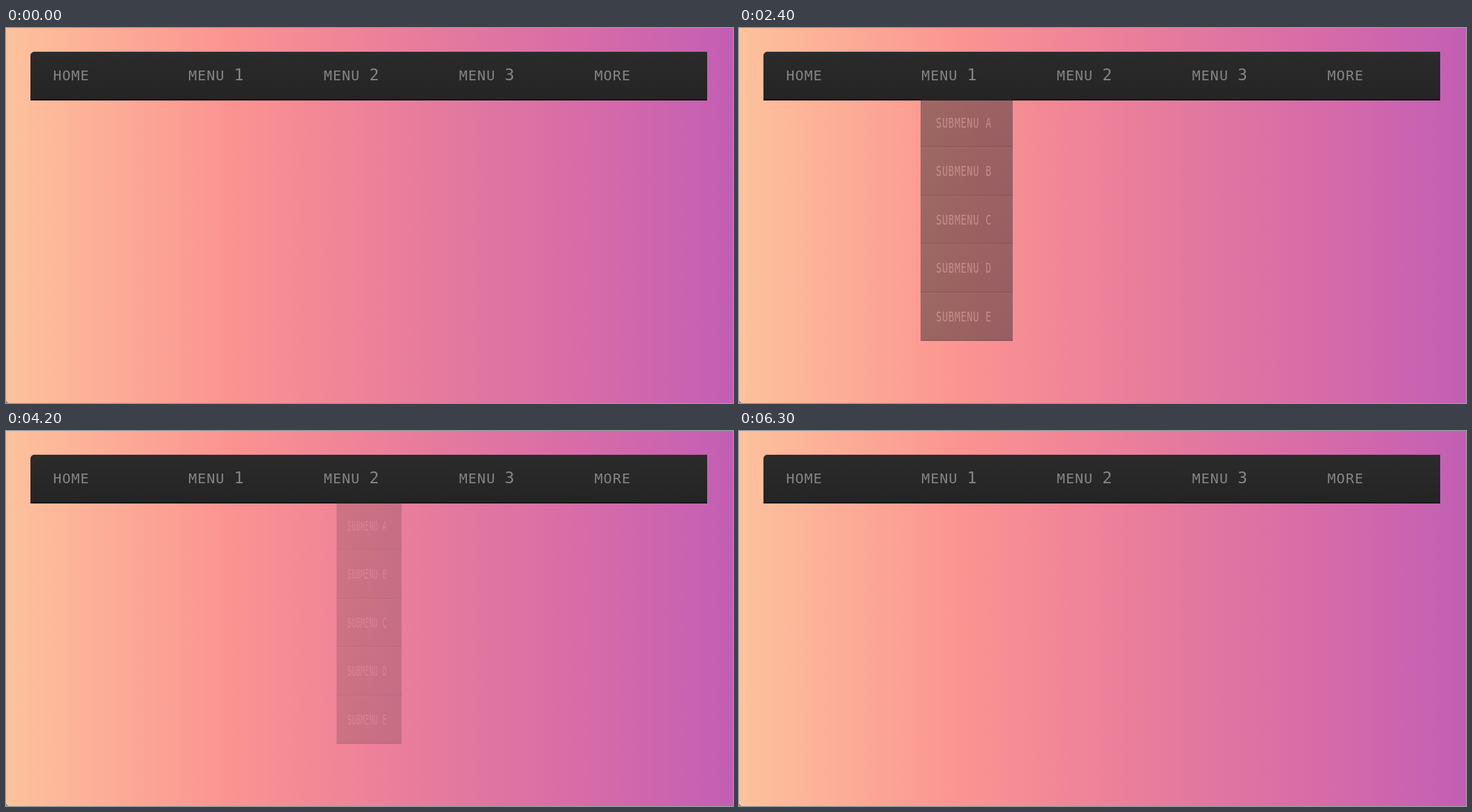
Animation, 1041 px wide and 538 px high, one loop 7.4 s. Source, as an HTML page:

```html
<!DOCTYPE html>
<html lang="en">
<head>
<meta charset="utf-8">
<title>Drop-down menu</title>
<style>
  html, body { margin: 0; width: 100%; height: 100%; overflow: hidden; }
  body {
    position: relative;
    background: linear-gradient(90deg, #fdc29c, #fb9391 31%, #ee8199 50%, #e3789f 62%, #d469aa 83%, #c25eb4);
    font: 20px/68px "DejaVu Sans Mono", monospace;
    letter-spacing: 1px;
    color: #858585;
  }
  body::after {
    content: ""; position: absolute; left: 0; bottom: 0; width: 6px; height: 6px;
    background: radial-gradient(circle at 6px 0, #0000 6px, #888 6.5px);
  }
  nav { position: absolute; top: 34px; left: 35px; }
  .item, .row {
    position: absolute; box-sizing: border-box; width: 193.8px; padding-left: 32.4px;
    white-space: pre; background: linear-gradient(#2b2b2b, #242424);
    box-shadow: inset 0 1px #363639, inset 0 -2px #161616;
  }
  .item { height: 69.6px; }
  .item:first-child { border-top-left-radius: 6px; }
  .row { left: 0; height: 69.4px; }
  .item.on { color: #d0302f; box-shadow: inset 0 2px #161616, inset 0 -2px #161616; }
  .row.on { color: #fff; -webkit-text-stroke: .5px #fff; box-shadow: inset 0 2px #141414; }
  .on::before {
    content: ""; position: absolute; inset: 2px 0 2px 0;
    border-left: 3px solid #484848;
  }
  .item.on::before { border-color: #c22fa8; border-top-left-radius: 6px; }
  .sub { position: absolute; top: 68px; width: 193.8px; height: 347px; }
  i { font: 23px/0 "DejaVu Sans Mono", monospace; letter-spacing: 0; }
</style>
</head>
<body>
<nav></nav>
<script>
const LOOP = 7400, STEP = 100, FADE = 500, WIDTH = 193.8, ROW = 69.4;
const OPEN_LAG = 10, CLOSE_LAG = 60;

// [time, hovered item]; -1 means none
const itemHover = [[0, -1], [500, 0], [1200, 1], [2300, -1], [2900, 2], [4000, -1],
                   [4300, 3], [5500, -1], [5700, 4], [6300, -1]];
// [time, hovered row of the open submenu]
const rowHover = [[0, -1], [1600, 0], [1900, 2], [2000, 3], [2200, 4], [2300, -1],
                  [3500, 0], [3600, 1], [3800, 3], [4000, -1],
                  [5000, 0], [5100, 1], [5200, 2], [5300, 3], [5500, -1]];
// [item, opening time, closing time]
const spans = [[1, 1130, 2300], [2, 2900, 4000], [3, 4300, 5500]];

const nav = document.querySelector('nav');

function add(parent, className, html = '') {
  const el = document.createElement('div');
  el.className = className;
  el.innerHTML = html;
  return parent.appendChild(el);
}

const items = ['HOME', 'MENU 1', 'MENU 2', 'MENU 3', 'MORE'].map((label, k) => {
  const el = add(nav, 'item', label.replace(/\d/, '<i>$&</i>'));
  el.style.left = k * WIDTH + 'px';
  return el;
});

const menus = spans.map(([item, open, close]) => {
  const el = add(nav, 'sub');
  el.style.left = item * WIDTH + 'px';
  const rows = [...'ABCDE'].map((letter, k) => {
    const row = add(el, 'row', 'SUBMENU ' + letter);
    row.style.top = k * ROW + 'px';
    return row;
  });
  return { el, rows, item, open, close };
});

const clamp = v => Math.min(1, Math.max(0, v));
const stateAt = (list, t) => list.findLast(([start]) => start <= t)[1];

// The standard CSS "ease" curve, cubic-bezier(.25, .1, .25, 1)
function ease(x) {
  let lo = 0, hi = 1;
  const bezier = (s, a, b) => 3 * s * (1 - s) ** 2 * a + 3 * s * s * (1 - s) * b + s ** 3;
  for (let k = 0; k < 20; k++) {
    const mid = (lo + hi) / 2;
    if (bezier(mid, .25, .25) < x) lo = mid; else hi = mid;
  }
  return bezier(hi, .1, 1);
}

function render(t) {
  const hovered = stateAt(itemHover, t), picked = stateAt(rowHover, t);
  nav.style.left = (hovered > 0 && hovered < 4 ? 32 : 35) + 'px';
  items.forEach((el, k) => el.classList.toggle('on', k === hovered));

  for (const { el, rows, item, open, close } of menus) {
    const closing = t >= close;
    const x = clamp((closing ? t - close + CLOSE_LAG : t - open + OPEN_LAG) / FADE);
    const visible = closing ? x < 1 : t >= open;
    el.style.display = visible ? '' : 'none';
    el.style.opacity = closing ? 1 - ease(x) : x < 1 ? ease(x) : 1;
    el.style.transform = x === 1 ? 'none' : `scaleX(${closing ? 1 - x : x})`;
    rows.forEach((row, k) => row.classList.toggle('on', item === hovered && k === picked));
  }
}

const start = performance.now();
function tick() {
  const t = (performance.now() - start) % LOOP;
  render(Math.floor(t / STEP) * STEP);
  requestAnimationFrame(tick);
}
tick();
</script>
</body>
</html>
```
